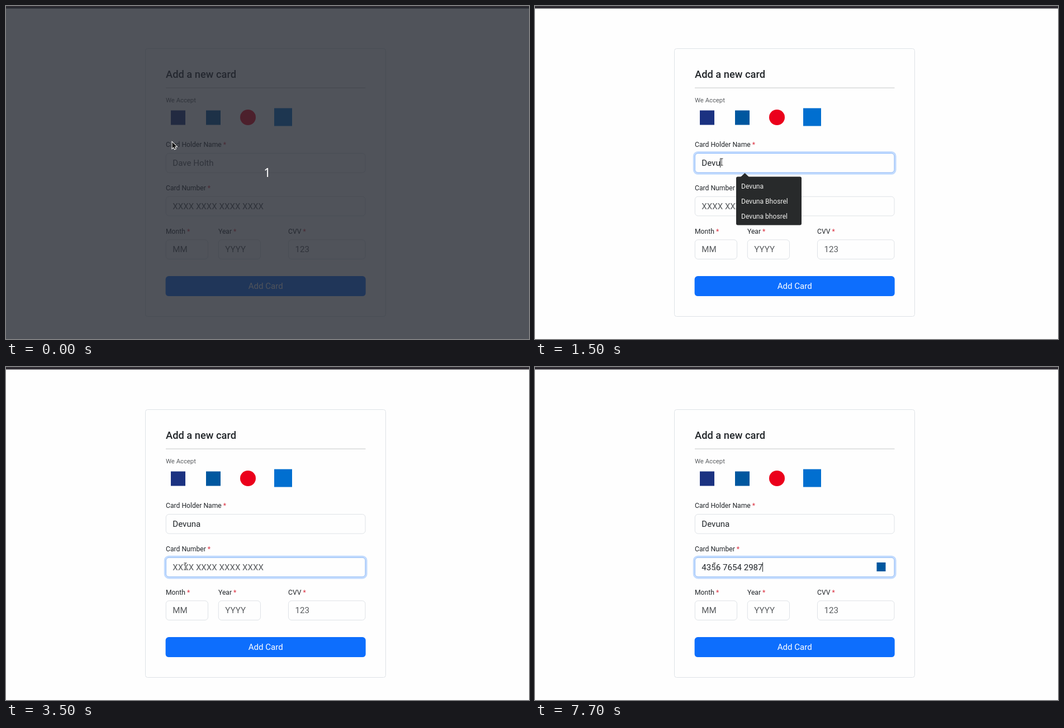
Write an HTML page with a canvas that moves like this. It is 936x598 px and loops after 8 s.

```html
<!DOCTYPE html>
<html lang="en">
<head>
<meta charset="utf-8">
<title>Add a new card</title>
<style>
  html, body { margin: 0; width: 100%; height: 100%; overflow: hidden; background: #fefefe; }
  canvas { display: block; }
</style>
</head>
<body>
<canvas id="stage" width="936" height="598"></canvas>
<script>
const ctx = document.getElementById('stage').getContext('2d');
const LOOP = 8000, STEP = 100;
const PAPER = '#fefefe', INK = '#212529', HINT = '#595c5f', LINE = '#dee2e6', BLUE = '#0d6efd';
const BODY = 15.1, SMALL = 12.16;

const NAME = 'Devuna', NUMBER = '4356 7654 2987';
const NAME_TIMES = [1100, 1200, 1300, 1500, 1800, 1900];
const DIGIT_TIMES = [4000, 4300, 4600, 4900, 5500, 5800, 6100, 6300, 6900, 7100, 7400, 7700];
const SUGGESTIONS = [NAME, NAME + ' Bhosrel', NAME + ' bhosrel', 'Dev'];

const POINTER = [
  { t: 200, x: 297.5, y: 244.5 },
  { t: 600, x: 334, y: 280 },
  { t: 2300, x: 334, y: 280 },
  { t: 2800, x: 321, y: 358 }
];

const clamp = v => Math.min(1, Math.max(0, v));
const fade = (t, start, length = 150) => clamp((t - start) / length);
const countBefore = (times, t) => times.filter(at => at <= t).length;

function text(str, x, y, size, color, weight = 400, align = 'left') {
  ctx.font = `${weight} ${size}px Roboto, sans-serif`;
  ctx.textAlign = align;
  ctx.fillStyle = color;
  ctx.fillText(str, x, y);
  return ctx.measureText(str).width;
}

function box(x, y, w, h, r, fill, stroke, lineWidth = 1) {
  ctx.beginPath();
  ctx.roundRect(x, y, w, h, r);
  if (fill) { ctx.fillStyle = fill; ctx.fill(); }
  if (stroke) { ctx.strokeStyle = stroke; ctx.lineWidth = lineWidth; ctx.stroke(); }
}

function polygon(points, fill, stroke) {
  ctx.beginPath();
  points.forEach(([x, y]) => ctx.lineTo(x, y));
  ctx.closePath();
  if (stroke) { ctx.strokeStyle = stroke; ctx.lineWidth = 2; ctx.stroke(); }
  ctx.fillStyle = fill;
  ctx.fill();
}

function square(cx, cy, size, color) {
  ctx.fillStyle = color;
  ctx.fillRect(cx - size / 2, cy - size / 2, size, size);
}

function label(str, x, y) {
  const width = text(str + ' ', x, y, SMALL, INK);
  text('*', x + width, y, SMALL, '#dc3545');
}

function field({ x, y, w, value = '', hint, focus = 0, caret = false }) {
  box(x + .5, y + .5, w - 1, 34.7, 5.5, PAPER, LINE);
  if (focus) {
    ctx.globalAlpha = focus;
    box(x - 1.5, y - 1.5, w + 3, 38.7, 7.2, null, '#c2dbfe', 3);
    box(x + .5, y + .5, w - 1, 34.7, 5.5, null, '#86b7fe');
    ctx.globalAlpha = 1;
  }
  const left = x + 12.5, base = y + 23;
  const width = text(value || hint, left, base, BODY, value ? INK : HINT);
  if (caret) {
    ctx.fillStyle = INK;
    ctx.fillRect(Math.floor(left + (value ? width : 0)), y + 9, 1, 17);
  }
}

function popup(t) {
  const alpha = t < 2000 ? fade(t, 650) : 1 - fade(t, 2875);
  if (!alpha) return;
  const items = SUGGESTIONS.slice(0, t < 1200 ? 4 : 3);
  const height = 6 + items.length * 27;
  const scale = .9 + .1 * alpha;
  ctx.save();
  ctx.globalAlpha = alpha;
  ctx.translate(418, 306 + height / 2);
  ctx.scale(scale, scale);
  ctx.translate(-418, -306 - height / 2);
  polygon([[368, 307], [375.5, 300], [383, 307]], '#282a2b');
  box(360, 306.5, 117, height, 3, '#282a2b');
  items.forEach((item, i) => text(item, 369, 327.5 + i * 27, 12.1, '#eeeeec'));
  ctx.restore();
}

function pointerAt(t) {
  let last = POINTER[0];
  for (const next of POINTER) {
    if (t < next.t) {
      const k = clamp((t - last.t) / (next.t - last.t));
      const e = k * k * (3 - 2 * k);
      return [last.x + (next.x - last.x) * e, last.y + (next.y - last.y) * e];
    }
    last = next;
  }
  return [last.x, last.y];
}

function pointer(t) {
  const [x, y] = pointerAt(t);
  const overField = (y > 264 && y < 300) || (y > 342 && y < 378);
  ctx.save();
  ctx.translate(x, y);
  if (overField) {
    for (const [color, width] of [['#fff', 2.4], ['#333', 1]]) {
      ctx.beginPath();
      ctx.moveTo(-2.5, -6); ctx.lineTo(2.5, -6);
      ctx.moveTo(0, -6); ctx.lineTo(0, 6);
      ctx.moveTo(-2.5, 6); ctx.lineTo(2.5, 6);
      ctx.strokeStyle = color;
      ctx.lineWidth = width;
      ctx.stroke();
    }
  } else {
    polygon([[0, 0], [0, 11], [2.6, 8.8], [4.3, 12.6], [6.2, 11.7], [4.5, 8], [8, 7.8]], '#111', '#fff');
  }
  ctx.restore();
}

function page(t) {
  ctx.fillStyle = PAPER;
  ctx.fillRect(0, 0, 936, 598);
  ctx.fillStyle = '#2f2c33';
  ctx.fillRect(0, 0, 936, 4.5);

  box(249.5, 76.5, 430, 481, 4, PAPER, LINE);
  text('Add a new card', 286, 129, 18.3, INK, 500);
  ctx.fillStyle = '#d3d4d5';
  ctx.fillRect(286, 146.4, 357.5, 1.3);
  text('We Accept', 286, 172.7, 11.3, '#595c5f');

  square(308, 200.5, 26, '#1b3281');
  square(371, 200.5, 26, '#00579f');
  ctx.fillStyle = '#eb001b';
  ctx.beginPath();
  ctx.arc(433, 200, 14, 0, Math.PI * 2);
  ctx.fill();
  square(496, 199.5, 32, '#016fd0');

  label('Card Holder Name', 286, 253.2);
  label('Card Number', 286, 331.2);
  label('Month', 286, 409);
  label('Year', 380, 409);
  label('CVV', 505, 409);

  const digits = countBefore(DIGIT_TIMES, t);
  const spaces = digits ? Math.floor((digits - 1) / 4) : 0;
  field({
    x: 285.8, y: 264, w: 357.8, hint: 'Dave Holth',
    value: NAME.slice(0, countBefore(NAME_TIMES, t)),
    focus: fade(t, 580) * (1 - fade(t, 2875)),
    caret: t >= 600 && t < 2900
  });
  field({
    x: 285.8, y: 341.7, w: 357.8, hint: 'XXXX XXXX XXXX XXXX',
    value: NUMBER.slice(0, digits + spaces),
    focus: fade(t, 2890),
    caret: (t >= 2900 && t < 3500) || t >= 4000
  });
  if (t >= 5200) square(619.5, 359, 16, '#00579f');
  field({ x: 285.8, y: 419.3, w: 76.2, hint: 'MM' });
  field({ x: 379.8, y: 419.3, w: 76.2, hint: 'YYYY' });
  field({ x: 505, y: 419.3, w: 138.5, hint: '123' });

  box(285.6, 485.1, 358.1, 36, 5.7, BLUE);
  text('Add Card', 464.7, 508.3, BODY, '#fff', 400, 'center');
}

function countdown() {
  ctx.fillStyle = 'rgba(37, 41, 49, .8)';
  ctx.fillRect(0, 2, 936, 596);
  ctx.font = '22px "Noto Sans", sans-serif';
  ctx.textAlign = 'center';
  ctx.fillStyle = '#fff';
  ctx.fillText('1', 467.5, 307);
}

const start = performance.now();
function frame() {
  const t = Math.floor(((performance.now() - start) % LOOP) / STEP) * STEP;
  page(t);
  popup(t);
  if (t < 100) countdown();
  pointer(t);
  requestAnimationFrame(frame);
}
frame();
</script>
</body>
</html>
```
